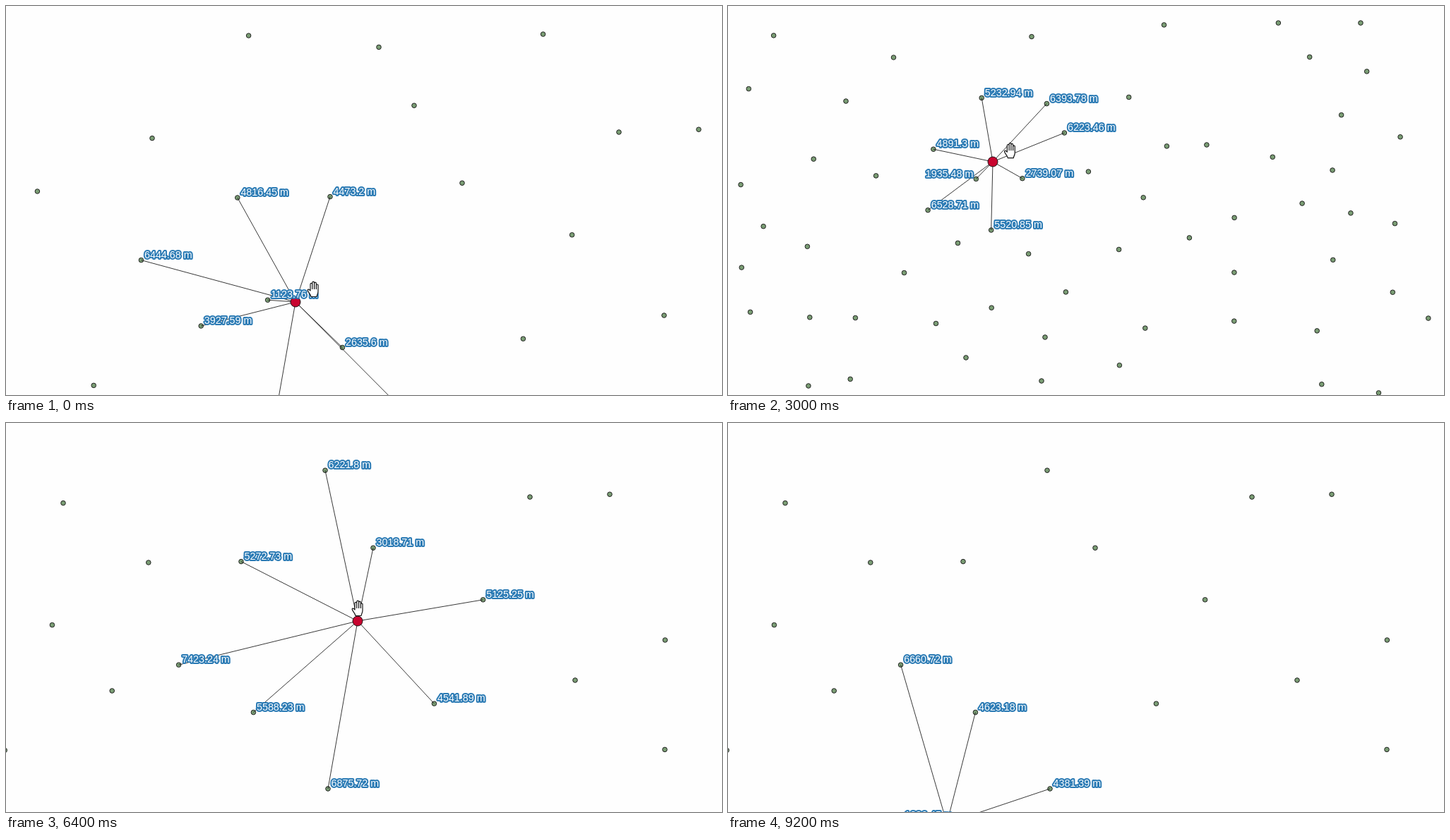
Recreate the animation shown at these times as an HTML page. Size 1014 by 552 pixels, loop 9.4 s.

```html
<!DOCTYPE html>
<html lang="en">
<head>
<meta charset="utf-8">
<title>Nearest neighbours</title>
<style>
  html, body { margin: 0; width: 100%; height: 100%; overflow: hidden; background: #fefefe; }
  svg { display: block; width: 100%; height: 100%; }
  #dots circle { fill: #7a9d74; stroke: #232323; stroke-width: 1; }
  #links line { stroke: #222; stroke-width: .9; }
  #probe { fill: #c8052f; stroke: #1f1014; stroke-width: 1; }
  #labels text {
    font: 14.3px "Liberation Sans", Arial, sans-serif;
    fill: #fbfdff; stroke: #2a7ab4; stroke-width: 4;
    stroke-linejoin: round; paint-order: stroke;
  }
  #hand { fill: #fff; stroke: #111; stroke-width: 1.2; stroke-linejoin: round; stroke-linecap: round; }
</style>
</head>
<body>
<svg viewBox="0 0 1014 552">
  <g id="dots"></g>
  <g id="links"></g>
  <circle id="probe" r="7"/>
  <g id="labels"></g>
  <path id="hand" d="M-3 10.5C-3.5 7-7.8 3.5-7.8 1.2C-7.6-.6-5.6-.2-4 2V-7Q-3.9-8.7-2.6-8.7T-1.2-7V-9Q-1.2-10.8 .2-10.8T1.6-9V-8Q1.7-9.8 3-9.8T4.4-8V-5.5Q4.5-7 5.8-7T7-5.4V3C7 7 5 8 5 10.5ZM-1.2-7V-.5M1.6-8V-.5M4.4-5.5V-.5"/>
</svg>
<script>
const WIDTH = 1014, HEIGHT = 552;
const STEP = 200, LOOP = 9400, NEAREST = 8, SITES = 63;
const METRES = 56.9; // per map unit

// The sites the probe can reach, in map units
const sites = [
  [359.2, 130.4], [451.4, 138.6], [567.7, 129.4], [476.4, 180], [290.9, 203.2], [621.4, 198.9],
  [677.9, 197], [209.6, 240.9], [510.4, 235], [351.3, 245.4], [416.9, 244.7], [588.2, 271.8],
  [283.1, 289.7], [372.7, 318], [325.5, 336.4], [425.6, 351.7], [553.6, 345.5], [653.4, 328.9],
  [249.5, 378.6], [478.4, 405.9], [717.1, 300.4], [716.9, 378.1], [234.5, 73], [430, 43.5],
  [167, 135], [373.2, 428.2], [294.5, 450.5], [337, 499], [449, 470], [444, 532]
];

// Map window and zoom, from the given step on
const views = [
  { from: 0, zoom: 2, x: 187.4, y: 109.4 },
  { from: 15, zoom: 1, x: 0, y: 0 },
  { from: 29, zoom: 2, x: 250.4, y: 146.4 }
];

// Turning points of the probe: step, x, y
const turns = [
  [0, 392.4, 319.4], [1, 404.9, 312.4], [6, 515, 222], [9, 440.4, 191.4], [10, 379.4, 185.9],
  [12, 382, 252], [15, 375, 221], [18, 440, 185], [21, 290, 153.5], [22, 249, 136],
  [26, 423, 286.5], [27, 464, 290], [29, 501, 294], [32, 499.4, 286.9], [33, 499.4, 279.9],
  [35, 513, 264.4], [38, 545, 275], [41, 510.9, 295.1], [42, 512.9, 293.9], [46, 405.4, 430.4],
  [47, 350, 500]
];

const $ = id => document.getElementById(id);
const set = (el, attrs) => { for (const k in attrs) el.setAttribute(k, attrs[k]); };
const make = (tag, parent, attrs = {}) => {
  const el = document.createElementNS("http://www.w3.org/2000/svg", tag);
  set(el, attrs);
  return $(parent).appendChild(el);
};
const fill = (n, tag, parent) => Array.from({ length: n }, () => make(tag, parent));

let seed = 11;
function random() {
  seed = (seed * 16807) % 2147483647;
  return seed / 2147483647;
}

// Scatter the outlying sites evenly, clear of the zoomed windows and the probe
function scatter() {
  const gap = (x, y, [a, b]) => Math.hypot(x - a, y - b);
  for (let i = 0; i < 9000 && sites.length < SITES; i++) {
    const x = 18 + random() * (WIDTH - 40), y = 14 + random() * (HEIGHT - 16);
    const inWindow = x > 184 && x < 761 && y > 105 && y < 426;
    const nearProbe = gap(x, y, [290, 153]) < 158 || gap(x, y, [405, 430]) < 124;
    if (!inWindow && !nearProbe && sites.every(s => gap(x, y, s) > 50)) sites.push([x, y]);
  }
}
scatter();

// Smooth curve through the turning points
function slope(i, axis) {
  const a = turns[Math.max(i - 1, 0)], b = turns[Math.min(i + 1, turns.length - 1)];
  return (b[axis] - a[axis]) / (b[0] - a[0]);
}
function probeAt(step) {
  const i = Math.max(turns.findIndex(k => k[0] > step) - 1, 0);
  const last = step >= turns.at(-1)[0] ? turns.length - 2 : i;
  const a = turns[last], b = turns[last + 1], span = b[0] - a[0], u = (step - a[0]) / span;
  const ease = u * u * (3 - 2 * u);
  return [1, 2].map(axis => a[axis] + (b[axis] - a[axis]) * ease + span * u * (1 - u) *
    ((1 - u) * slope(last, axis) - u * slope(last + 1, axis)));
}

const dots = sites.map(() => make("circle", "dots", { r: 3.3 }));
const links = fill(NEAREST, "line", "links");
const labels = fill(NEAREST, "text", "labels");

const overlap = (a, b) => a.l < b.r && b.l < a.r && a.t < b.b && b.t < a.b;
const box = (x, y, w) => ({ l: x - 1.4, r: x + w + 1, t: y - 15, b: y - 0.7 });
const around = p => ({ l: p.x - 4, r: p.x + 4, t: p.y - 4, b: p.y + 4 });

// Labels sit right of their site, or left when that spot is taken
function placeLabels(near) {
  const taken = [];
  near.forEach((p, i) => {
    const el = labels[i];
    el.textContent = +p.d.toFixed(2) + " m";
    const w = el.getComputedTextLength();
    let x = p.x + 4.6;
    const right = box(x, p.y, w);
    const blocked = taken.some(b => overlap(right, b)) ||
      near.some(q => q !== p && overlap(right, around(q)));
    if (blocked) x = p.x - 4 - w;
    taken.push(box(x, p.y, w));
    set(el, { x, y: p.y - 2.8 });
  });
}

function draw(step) {
  const view = views.findLast(v => v.from <= step);
  const project = ([x, y]) => ({ x: (x - view.x) * view.zoom, y: (y - view.y) * view.zoom });
  const probe = project(probeAt(step));
  const points = sites.map(project);
  points.forEach((p, i) => {
    p.d = Math.hypot(p.x - probe.x, p.y - probe.y) / view.zoom * METRES;
    set(dots[i], { cx: p.x, cy: p.y });
  });

  const near = [...points].sort((a, b) => a.d - b.d).slice(0, NEAREST);
  near.forEach((p, i) => set(links[i], { x1: probe.x, y1: probe.y, x2: p.x, y2: p.y }));
  placeLabels(near);
  set($("probe"), { cx: probe.x, cy: probe.y });

  // The hand runs one step ahead of the probe
  const lead = project(probeAt(step + 1));
  set($("hand"), { transform: `translate(${lead.x} ${lead.y - 4})` });
}

let shown = -1;
const start = performance.now();
function tick() {
  const step = Math.floor((performance.now() - start) % LOOP / STEP);
  if (step !== shown) draw(shown = step);
  requestAnimationFrame(tick);
}
tick();
</script>
</body>
</html>
```
